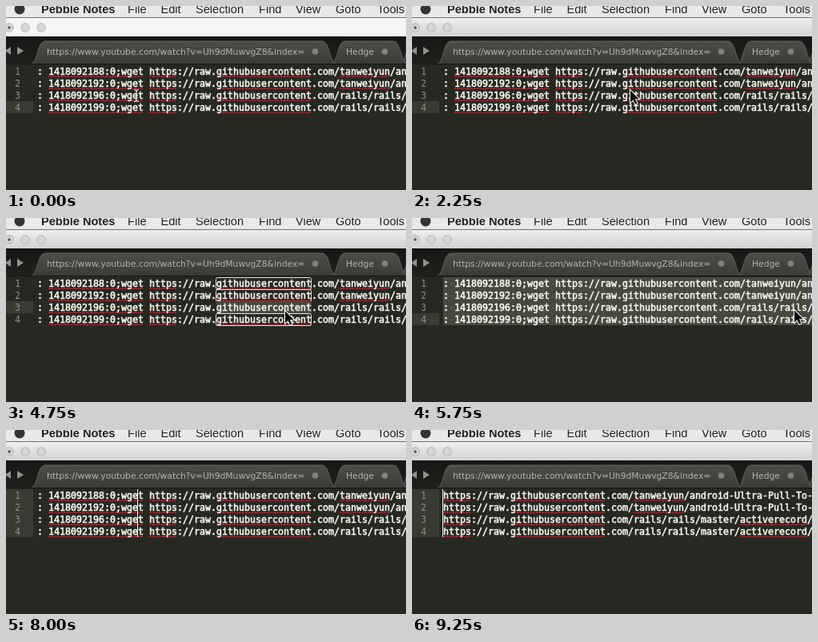
Animation, 500 px wide and 230 px high, one loop 9.5 s. Source, as an HTML page with a canvas:

```html
<!DOCTYPE html>
<html lang="en">
<head>
<meta charset="utf-8">
<title>Editor with several cursors</title>
<style>
html, body { margin: 0; height: 100%; overflow: hidden; background: #272822; }
canvas { display: block; }
</style>
</head>
<body>
<canvas id="stage" width="500" height="230"></canvas>
<script>
const ctx = document.getElementById('stage').getContext('2d');
const LOOP = 9500, STEP = 250;
const LEFT = 39, TOP = 74, CHAR = 7, ROW = 15;
const MONO = '11.63px "DejaVu Sans Mono", monospace';
const MENU = '14.6px "Liberation Sans", sans-serif';
const TAB = '10.75px "DejaVu Sans", sans-serif';
const WORD = 'githubusercontent';
const HOST = `https://raw.${WORD}.com/`;
const HEAD = 20;

const lines = [88, 92, 96, 99].map((id, i) => ({
  head: `: 14180921${id}:0;wget `.replace('80921', '80921'),
  url: HOST + (i < 2 ? 'tanweiyun/android-Ultra-Pull-To-Refresh/' : 'rails/rails/master/activerecord/')
}));

// time, x, y of the arrow tip
const path = [
  [2250, 273, 105], [3250, 480, 117], [3500, 480, 117],
  [4250, 349, 116], [4750, 349, 116], [5500, 478, 115]
];

const clamp = (v, lo, hi) => Math.max(lo, Math.min(hi, v));
const colX = col => LEFT + col * CHAR;
const rowY = row => TOP + row * ROW;

function box(x, y, w, h, fill) {
  ctx.fillStyle = fill;
  ctx.fillRect(x, y, w, h);
}

function text(s, x, y, font, fill) {
  ctx.font = font;
  ctx.fillStyle = fill;
  ctx.fillText(s, x, y);
}

function outline(color, width = 1) {
  ctx.strokeStyle = color;
  ctx.lineWidth = width;
  ctx.stroke();
}

function disc(x, y, r, fill, edge) {
  ctx.beginPath();
  ctx.arc(x, y, r, 0, 7);
  ctx.fillStyle = fill;
  ctx.fill();
  if (edge) outline(edge);
}

function poly(points, fill, edge) {
  ctx.beginPath();
  points.forEach(([x, y]) => ctx.lineTo(x, y));
  ctx.closePath();
  if (edge) outline(edge, 2);
  ctx.fillStyle = fill;
  ctx.fill();
}

function shade(y0, y1, from, to) {
  const g = ctx.createLinearGradient(0, y0, 0, y1);
  g.addColorStop(0, from);
  g.addColorStop(1, to);
  return g;
}

function tab(x0, x1) {
  ctx.beginPath();
  ctx.moveTo(x0, 72);
  ctx.bezierCurveTo(x0 + 8, 70, x0 + 7, 44, x0 + 17, 44);
  ctx.lineTo(x1 - 17, 44);
  ctx.bezierCurveTo(x1 - 7, 44, x1 - 8, 70, x1, 72);
  ctx.fillStyle = shade(44, 72, '#4d4d4a', '#3b3b38');
  ctx.fill();
  outline('#6c6c69', 0.8);
}

function drawWindow(focused) {
  box(0, 0, 500, 230, '#272822');
  box(0, 0, 500, 14, '#e9e9e9');
  box(0, 14, 500, 1, '#707070');
  box(0, 15, 500, 23, focused ? shade(15, 38, '#eeeeee', '#d2d2d2') : '#f6f6f6');
  disc(17, 4, 6.5, '#333');
  text('Pebble Notes', 44, 9, 'bold ' + MENU, '#222');
  [['File', 152], ['Edit', 193.5], ['Selection', 237], ['Find', 316],
   ['View', 362], ['Goto', 412], ['Tools', 464]]
    .forEach(([s, x]) => text(s, x, 9, MENU, '#222'));
  [4, 24, 44].forEach(x => disc(x, 27, 5.3, '#d6d6d6', '#b4b4b4'));
  disc(4, 27, 1.8, '#555');

  box(0, 38, 500, 34, shade(38, 72, '#161714', '#20211d'));
  poly([[6, 51], [6, 61], [-1, 56]], '#92938f');
  poly([[14, 51], [14, 61], [22, 56]], '#92938f');
  tab(493, 600);
  tab(407, 501);
  tab(32, 412);
  text('https://www.youtube.com/watch?v=Uh9dMuwvgZ8&index=', 51, 61, TAB, '#b2b2ae');
  text('Hedge', 425, 61, TAB, '#b2b2ae');
  [386.5, 473.5].forEach(x => disc(x, 57, 3.8, '#82827f'));
  box(0, 72, 500, 1, '#151613');
}

// two rows of dots that interlock into a wavy line
function squiggle(from, to, row) {
  const end = colX(to) - 1;
  for (let x = colX(from); x < end; x += 4) {
    const y = rowY(row) + 13;
    box(x, y, Math.min(2, end - x), 1, '#a8161c');
    box(x, y + 1, Math.min(4, end - x), 1, '#b5181f');
  }
}

function drawLine(line, row, state) {
  const { kept, caret, active, picked, all } = state;
  const y = rowY(row), wordCol = kept + HOST.indexOf(WORD);
  const chosen = picked && row === 2;
  const s = line.head.slice(0, kept) + line.url;

  if (active(row)) box(0, y, 34, ROW, '#393a32');
  text(row + 1, 11, y + 12, MONO, '#8f908a');
  if (all) box(LEFT, y, 500, ROW, '#49483e');
  if (chosen) box(colX(wordCol), y, WORD.length * CHAR, ROW, '#49483e');

  if (all) {
    [1, HEAD - 1].forEach(c => box(colX(c) + 3, y + 8, 1, 1, '#8a897c'));
  } else {
    squiggle(2, Math.min(kept, HEAD - 1), row);
    ['https', WORD, 'tanweiyun', 'activerecord'].forEach(w => {
      const at = s.indexOf(w);
      if (at >= 0 && !(chosen && w === WORD)) squiggle(at, at + w.length, row);
    });
  }

  text(s, LEFT, y + 12, MONO, '#f8f8f2');
  ctx.strokeStyle = '#f8f8f2';
  ctx.lineWidth = 0.55;
  ctx.strokeText(s, LEFT, y + 12);

  if (picked && !chosen) {
    ctx.beginPath();
    ctx.roundRect(colX(wordCol) - 0.5, y + 0.5, WORD.length * CHAR, ROW, 2);
    outline('#e4e4dc');
  }
  if (caret >= 0) box(colX(caret) - 1, y, 1, ROW, '#f8f8f0');
}

function drawBeam(x, y) {
  ctx.beginPath();
  for (const side of [-3, 3]) {
    ctx.moveTo(x + side, y);
    ctx.quadraticCurveTo(x, y, x, y + 2.5);
    ctx.lineTo(x, y + 12.5);
    ctx.quadraticCurveTo(x, y + 15, x + side, y + 15);
  }
  outline('#e8e8e4', 1.2);
}

function drawPointer(t) {
  if (t < 2250) {
    drawBeam(163, 104.5);
  } else if (t < 6000) {
    const next = path.findIndex(p => p[0] > t);
    const b = path[next < 0 ? path.length - 1 : next];
    const a = next < 0 ? b : path[next - 1];
    const k = a === b ? 0 : (t - a[0]) / (b[0] - a[0]);
    const x = a[1] + (b[1] - a[1]) * k, y = a[2] + (b[2] - a[2]) * k;
    poly([[0, 0.5], [0, 15.5], [3.5, 12.3], [6, 17.8], [8.4, 16.8], [6, 11.3], [10.8, 11.3]]
      .map(([dx, dy]) => [x + dx, y + dy]), '#000', '#fff');
  }
}

function draw(now) {
  const t = Math.floor(now % LOOP / STEP) * STEP;
  const picked = t >= 4250 && t < 5500;
  const split = t >= 6000;
  // the carets walk right, then erase back at the same rate
  const kept = clamp(HEAD - (t - 8250) / 50, 0, HEAD);
  const caret = t < 6500 ? -1 : Math.min(kept, clamp((t - 7100) / 50, 0, HEAD));
  drawWindow(t >= 500);
  const state = {
    picked, kept, caret,
    all: t >= 5500 && t < 6500,
    active: row => split || row === (picked ? 2 : 3)
  };
  lines.forEach((line, row) => drawLine(line, row, state));
  drawPointer(t);
  requestAnimationFrame(() => draw(performance.now() - start));
}

const start = performance.now();
draw(0);
</script>
</body>
</html>
```
